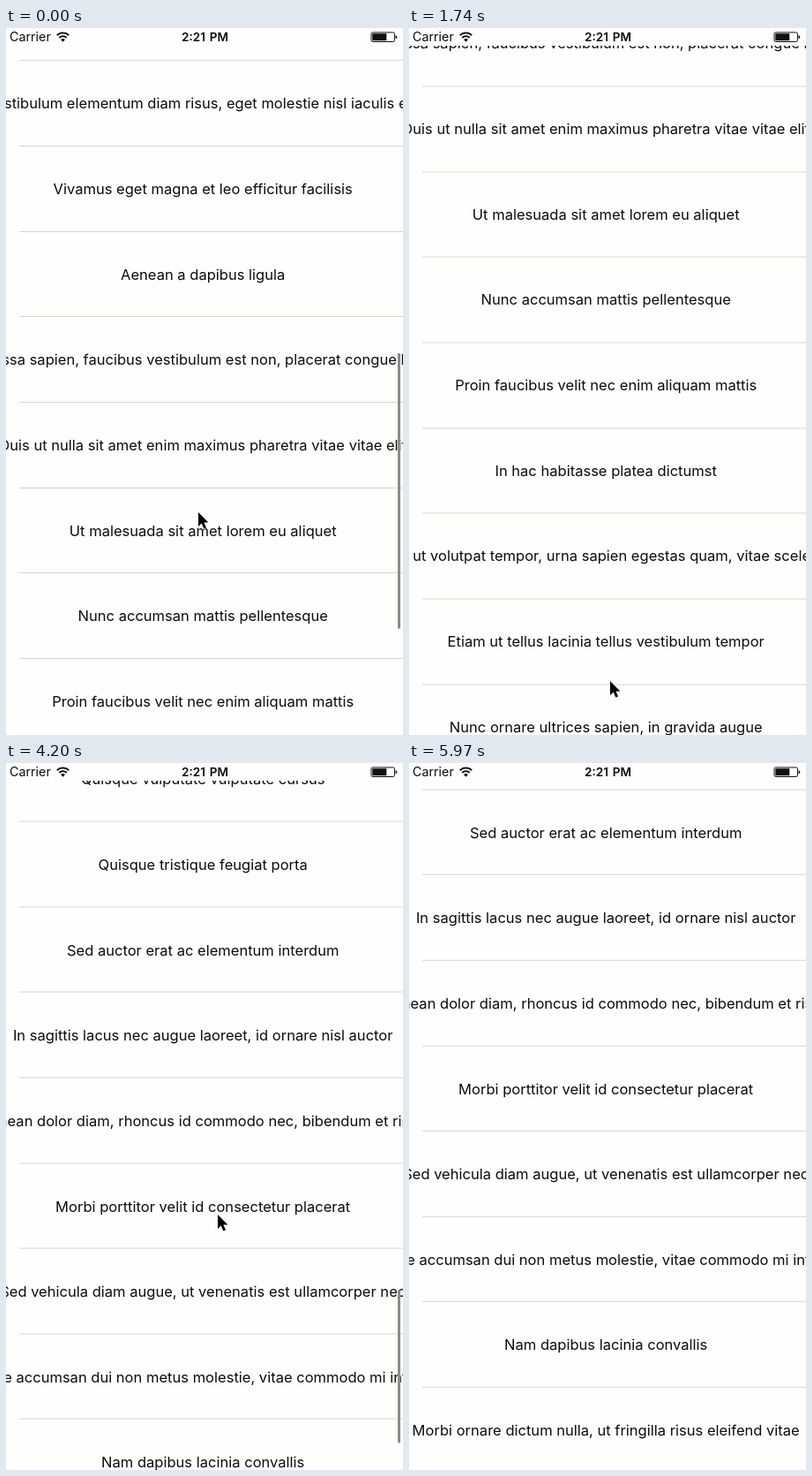
These frames come from a looping animation (450 px wide and 800 px high, 6000 ms). An HTML page:

```html
<!DOCTYPE html>
<html lang="en">
<head>
<meta charset="utf-8">
<title>Endless list</title>
<style>
  html, body { margin: 0; width: 100%; height: 100%; overflow: hidden; background: #fefefd; }
  #stage { position: relative; width: 450px; height: 800px; overflow: hidden; background: #fefefd;
    font: 16.55px Inter, "Open Sans", sans-serif; color: #0c0c0c; }
  #list { position: absolute; left: 0; top: 0; width: 450px; }
  .row { position: absolute; left: 0; width: 450px; height: 96.64px; line-height: 96.64px; }
  .row span { position: absolute; left: 223.2px; transform: translateX(-50%); white-space: nowrap; }
  .row::after { content: ""; position: absolute; left: 15px; right: 0; bottom: 0; height: 1px; background: #d6d6ce; }
  .row.last::after { display: none; }
  #bar { position: absolute; left: 0; top: 0; width: 450px; height: 20px; background: #fefefd;
    font-size: 14.3px; line-height: 20px; }
  #bar span { position: absolute; top: 0; white-space: nowrap; }
  #clock { left: 225.5px; transform: translateX(-50%); font-size: 13.6px; font-weight: 600; word-spacing: 1.2px; }
  #thumb { position: absolute; left: 444px; top: 0; width: 3px; border-radius: 1.5px; background: #8c8c84; }
  svg { position: absolute; left: 0; top: 0; overflow: visible; }
</style>
</head>
<body>
<div id="stage">
  <div id="list"></div>
  <svg id="spinner" width="1" height="1"></svg>
  <div id="thumb"></div>
  <div id="bar">
    <span style="left:4px">Carrier</span>
    <span id="clock">2:21 PM</span>
    <svg width="450" height="20" fill="none" stroke="#111">
      <path d="M57.8 8.3a9.6 9.6 0 0 1 13.4 0M60.3 11a6 6 0 0 1 8.4 0" stroke-width="2"/>
      <path d="M64.5 15.7l-2.5-2.6a3.6 3.6 0 0 1 5 0z" fill="#111" stroke="none"/>
      <rect x="414" y="5" width="26.5" height="10.5" rx="1.8" stroke-width="1"/>
      <path d="M415.3 6.3h16v8h-16zM441.6 8.3q1.8.4 1.8 2t-1.8 2z" fill="#111" stroke="none"/>
    </svg>
  </div>
  <svg id="cursor" width="12" height="20">
    <path d="M0 0V16L3.7 12.6L6.3 18.6L9 17.4L6.5 11.6H11.4Z" fill="#000" stroke="#fff" stroke-width="1" paint-order="stroke"/>
  </svg>
</div>
<script>
const LOOP = 6000, HEIGHT = 800, ROW = 96.64, FIRST = 37.48, FOOTER = 57;
const VIEW = 776, VIEW_TOP = 24, HIDDEN_ROWS = 9;

// The blank first row only carries the separator above the list
const lines = [
  "",
  "Vestibulum elementum diam risus, eget molestie nisl iaculis est",
  "Vivamus eget magna et leo efficitur facilisis",
  "Aenean a dapibus ligula",
  "Ut massa sapien, faucibus vestibulum est non, placerat congue lacinia",
  "Duis ut nulla sit amet enim maximus pharetra vitae vitae elit",
  "Ut malesuada sit amet lorem eu aliquet",
  "Nunc accumsan mattis pellentesque",
  "Proin faucibus velit nec enim aliquam mattis",
  "In hac habitasse platea dictumst",
  "Magnis ut volutpat tempor, urna sapien egestas quam, vitae scelerisque",
  "Etiam ut tellus lacinia tellus vestibulum tempor",
  "Nunc ornare ultrices sapien, in gravida augue",
  "Quisque eget lobortis dolor, sit amet posuere nisi",
  "Etiam ipsum libero, pulvinar vulputate leo eleifend, dapibus tempor",
  "Nam bibendum dictum odio, eget vehicula elit vehicula in",
  "Sed a risus a erat egestas ullamcorper vitae id massa",
  "Morbi blandit ligula sit amet sodales efficitur",
  "Quisque vulputate vulputate cursus",
  "Quisque tristique feugiat porta",
  "Sed auctor erat ac elementum interdum",
  "In sagittis lacus nec augue laoreet, id ornare nisl auctor",
  "Aenean dolor diam, rhoncus id commodo nec, bibendum et risus",
  "Morbi porttitor velit id consectetur placerat",
  "Sed vehicula diam augue, ut venenatis est ullamcorper nec",
  "Quisque accumsan dui non metus molestie, vitae commodo mi interdum",
  "Nam dapibus lacinia convallis",
  "Morbi ornare dictum nulla, ut fringilla risus eleifend vitae"
];

// One round: grab and drag, fling past the end, spring back, load the next page
const rounds = [
  { start: 0, peak: 750, load: 1560, rows: 11, over: 44.5, grab: [218, 548], drop: [238, 428] },
  { start: 1780, peak: 2770, load: 3680, rows: 21, over: 38, grab: [228, 739], drop: [219, 340] },
  { start: 3720, peak: 4530, load: 5300, rows: 27, over: 25, grab: [231, 656], drop: [240, 511] }
];
const DRAG = 300, SETTLE = 460, HOLD = 150, GLIDE = 600, FADE = 200, EXIT = [240, 830];

const clamp01 = v => Math.min(1, Math.max(0, v));
const mix = (a, b, u) => a + (b - a) * u;
const ease = (t, from, length) => {
  const u = clamp01((t - from) / length);
  return u * u * (3 - 2 * u);
};
const restAt = rows => FIRST + rows * ROW + FOOTER - HEIGHT;

function stateAt(t) {
  const i = rounds.findLastIndex(r => t >= r.start);
  const round = rounds[i], next = rounds[i + 1];
  const from = i ? restAt(rounds[i - 1].rows) : 0;
  const rest = restAt(round.rows);
  const settled = round.peak + SETTLE;
  const loaded = t >= round.load;

  let scroll = mix(from, rest + round.over, ease(t, round.start, round.peak - round.start));
  scroll -= round.over * ease(t, round.peak, SETTLE);
  if (!next) scroll -= (FOOTER + 3.5) * ease(t, round.load, 320);

  const drag = ease(t, round.start, DRAG);
  const glide = ease(t, round.peak + HOLD, GLIDE * (i === 1 ? 0.5 : 1));
  const goal = next ? next.grab : EXIT;
  return {
    scroll, loaded,
    rows: loaded && next ? next.rows : round.rows,
    footer: !loaded && scroll > rest - FOOTER,
    thumb: 1 - clamp01((t - settled - 80) / FADE),
    cursor: round.grab.map((p, k) => mix(mix(p, round.drop[k], drag), goal[k], glide))
  };
}

const el = id => document.getElementById(id);
const list = el("list"), thumb = el("thumb"), spinner = el("spinner"), cursor = el("cursor");

const rows = lines.map((text, i) => {
  const row = document.createElement("div");
  const label = document.createElement("span");
  row.className = "row";
  row.style.top = FIRST + (i - 1) * ROW + "px";
  label.textContent = text;
  row.append(label);
  list.append(row);
  return row;
});

const spokes = Array.from({ length: 12 }, (_, i) => {
  const line = document.createElementNS("http://www.w3.org/2000/svg", "path");
  line.setAttribute("d", "M0-6.6V-11");
  line.setAttribute("transform", `rotate(${i * 30})`);
  line.setAttribute("stroke", "#77776c");
  line.setAttribute("stroke-width", "2.2");
  line.setAttribute("stroke-linecap", "round");
  spinner.append(line);
  return line;
});

function drawThumb(s) {
  const content = (s.rows + HIDDEN_ROWS) * ROW + (s.footer ? FOOTER : 0);
  const offset = s.scroll + HIDDEN_ROWS * ROW + VIEW_TOP - FIRST;
  const over = Math.max(0, offset - (content - VIEW));
  const scale = VIEW / content;
  const length = VIEW * scale - over;
  const top = over ? HEIGHT - length : VIEW_TOP + offset * scale;
  thumb.style.height = length + "px";
  thumb.style.transform = `translateY(${top}px)`;
  thumb.style.opacity = s.thumb;
}

function drawSpinner(t, s) {
  spinner.style.display = s.footer ? "" : "none";
  spinner.style.transform = `translate(223px, ${FIRST + s.rows * ROW - s.scroll + 29.7}px)`;
  const head = Math.floor((t + 730) / 1000 * 12);
  spokes.forEach((line, i) => {
    const age = (head - i + 12) % 12;
    line.style.opacity = Math.max(0.25, 0.9 - age * 0.09);
  });
}

function draw(t) {
  const s = stateAt(t);
  list.style.transform = `translateY(${-s.scroll}px)`;
  rows.forEach((row, i) => {
    row.style.display = i <= s.rows ? "" : "none";
    row.classList.toggle("last", i === s.rows);
  });
  drawSpinner(t, s);
  drawThumb(s);
  cursor.style.transform = `translate(${s.cursor[0]}px, ${s.cursor[1]}px)`;
}

const start = performance.now();
function tick() {
  draw((performance.now() - start) % LOOP);
  requestAnimationFrame(tick);
}
tick();
</script>
</body>
</html>
```
